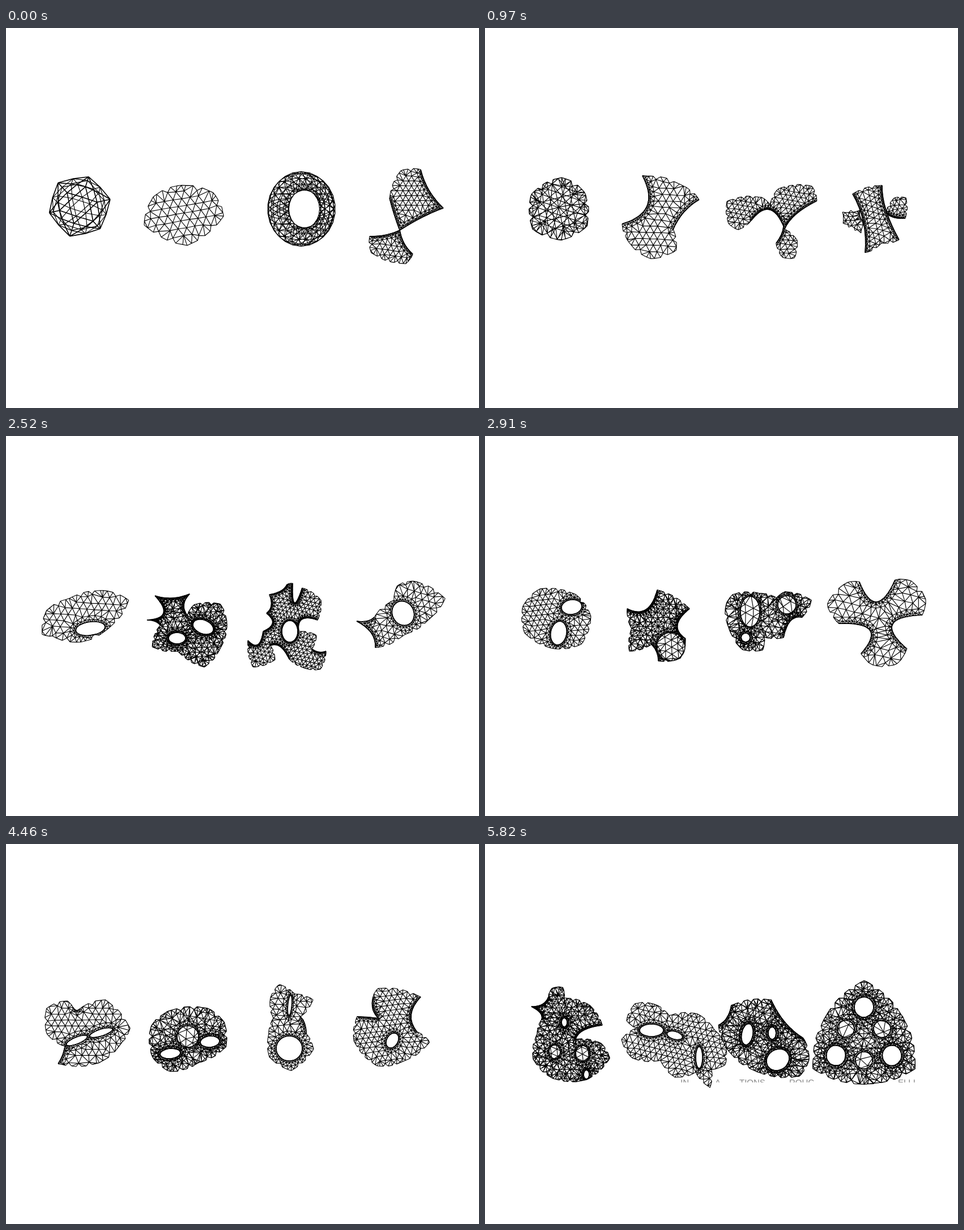
Write an HTML page with a canvas that moves like this. It is 835 px wide and 671 px high and loops after 6.79 s.

```html
<!DOCTYPE html>
<html lang="en">
<head>
<meta charset="utf-8">
<title>Wireframe surfaces</title>
<style>
html, body { margin: 0; width: 100%; height: 100%; overflow: hidden; background: #fff; }
canvas { display: block; }
</style>
</head>
<body>
<canvas id="stage" width="835" height="671"></canvas>
<script>
const HOLD = 970, RAD = Math.PI / 180;
const ctx = document.getElementById('stage').getContext('2d');
let fine, bold, seed = 7;

const random = () => (seed = seed * 16807 % 2147483647) / 2147483647;
const dist = (a, b) => Math.hypot(a[0] - b[0], a[1] - b[1]);
const polar = (cx, cy, r, deg) => [cx + r * Math.cos(deg * RAD), cy + r * Math.sin(deg * RAD)];
const line = (a, b, path = fine) => { path.moveTo(a[0], a[1]); path.lineTo(b[0], b[1]); };

// A hole is empty; a ring lets the layer behind it show through.
const hole = (x, y, rx, ry = rx, turn = 0) => ({ x, y, rx, ry, turn });
const ring = (x, y, rx, ry = rx) => ({ ...hole(x, y, rx, ry), backed: true });

// Clockwise outline: plain runs bow out and are scalloped, Q runs are smooth necks.
function trace(d, cell) {
  const tokens = d.match(/Q|[\d.]+/g), outline = [], rows = [];
  let i = 0;
  const next = () => [+tokens[i++], +tokens[i++]];
  const start = next();
  let pen = start;
  outline.push(start);

  function scallop(end) {
    const len = dist(pen, end);
    if (len < 1) return;
    const bumps = Math.max(1, Math.round(len / cell / 1.7));
    const dx = (end[0] - pen[0]) / len, dy = (end[1] - pen[1]) / len;
    const put = (t, dip) => {
      const out = len * .08 * Math.sin(Math.PI * t) - dip;
      outline.push([pen[0] + dx * len * t + dy * out, pen[1] + dy * len * t - dx * out]);
    };
    for (let k = 0; k < bumps; k++) {
      put((k + .28) / bumps, 0);
      put((k + .72) / bumps, 0);
      if (k < bumps - 1) put((k + 1) / bumps, cell * .45);
    }
    outline.push(end);
    pen = end;
  }

  function neck(c, end) {
    const n = Math.ceil((dist(pen, c) + dist(c, end)) / cell / .4);
    bold.addPath(new Path2D(`M${pen} Q${c} ${end}`));
    for (let k = 1; k <= n; k++) {
      const t = k / n, u = 1 - t;
      const p = [0, 1].map(a => u * u * pen[a] + 2 * u * t * c[a] + t * t * end[a]);
      const v = [0, 1].map(a => u * (c[a] - pen[a]) + t * (end[a] - c[a]));
      const len = Math.hypot(...v) || 1;
      const inset = r => rows.push([p[0] - v[1] / len * r, p[1] + v[0] / len * r]);
      outline.push(p);
      inset(cell * .28);
      if (k % 2) inset(cell * .75);
    }
    pen = end;
  }

  while (i < tokens.length) {
    if (tokens[i] === 'Q') { i++; neck(next(), next()); }
    else scallop(next());
  }
  scallop(start);
  return { outline, rows };
}

function inPolygon(poly, x, y) {
  let hit = false;
  poly.forEach((a, i) => {
    const b = poly[(i + 1) % poly.length];
    if (a[1] > y !== b[1] > y && x < a[0] + (y - a[1]) / (b[1] - a[1]) * (b[0] - a[0])) hit = !hit;
  });
  return hit;
}

function inHole(h, x, y) {
  const c = Math.cos(h.turn * RAD), s = Math.sin(h.turn * RAD), dx = x - h.x, dy = y - h.y;
  return Math.hypot((dx * c + dy * s) / h.rx, (dy * c - dx * s) / h.ry) < 1;
}

function rim(h, grow, step) {
  const n = Math.max(8, Math.round(Math.PI * (h.rx + h.ry + 2 * grow) / step));
  const c = Math.cos(h.turn * RAD), s = Math.sin(h.turn * RAD);
  return Array.from({ length: n }, (_, k) => {
    const [u, v] = polar(0, 0, 1, 360 * k / n), a = u * (h.rx + grow), b = v * (h.ry + grow);
    return [h.x + a * c - b * s, h.y + a * s + b * c];
  });
}

// Delaunay triangulation by incremental insertion.
const edgeKey = (a, b) => Math.min(a, b) * 1e4 + Math.max(a, b);

function triangulate(pts) {
  const n = pts.length, all = [...pts, [-9000, -9000], [9900, -9000], [400, 9900]];
  function circle(a, b, c) {
    const [ax, ay] = all[a], bx = all[b][0] - ax, by = all[b][1] - ay;
    const cx = all[c][0] - ax, cy = all[c][1] - ay, d = 2 * (bx * cy - by * cx) || 1e-9;
    const b2 = bx * bx + by * by, c2 = cx * cx + cy * cy;
    const x = (cy * b2 - by * c2) / d, y = (bx * c2 - cx * b2) / d;
    return { v: [a, b, c], x: x + ax, y: y + ay, r: x * x + y * y };
  }
  let tris = [circle(n, n + 1, n + 2)];
  pts.forEach(([x, y], i) => {
    const open = new Map();
    tris = tris.filter(t => {
      if ((t.x - x) ** 2 + (t.y - y) ** 2 >= t.r) return true;
      t.v.forEach((a, k) => {
        const b = t.v[(k + 1) % 3], key = edgeKey(a, b);
        open.has(key) ? open.delete(key) : open.set(key, [a, b]);
      });
      return false;
    });
    for (const [a, b] of open.values()) tris.push(circle(a, b, i));
  });
  return tris.map(t => t.v).filter(v => v.every(k => k < n));
}

// Triangular lattice, tightened along necks and holes.
function weave(cell, angle, { outline, rows }, holes) {
  const pts = [], seen = new Set();
  const inside = (x, y) => inPolygon(outline, x, y) && !holes.some(h => inHole(h, x, y));
  const jitter = () => (random() - .5) * cell * .07;
  const add = (p, gap) => {
    if (pts.every(q => dist(p, q) >= gap)) pts.push([p[0] + jitter(), p[1] + jitter()]);
  };
  const fill = (p, gap) => inside(...p) && add(p, gap);

  outline.forEach(p => add(p, 1));
  for (const h of holes) {
    rim(h, .1, cell * .42).forEach(p => inPolygon(outline, ...p) && add(p, 1.5));
    rim(h, cell * .28, cell * .45).forEach(p => fill(p, cell * .2));
    rim(h, cell * .8, cell * .7).forEach(p => fill(p, cell * .35));
  }
  rows.forEach(p => fill(p, cell * .22));

  const mid = [0, 1].map(a => outline.reduce((s, p) => s + p[a], 0) / outline.length);
  const n = Math.ceil(140 / cell), c = Math.cos(angle * RAD), s = Math.sin(angle * RAD);
  for (let j = -n; j <= n; j++) for (let i = -n; i <= n; i++) {
    const u = (i + (j & 1) / 2) * cell, v = j * cell * .866;
    fill([mid[0] + u * c - v * s, mid[1] + u * s + v * c], cell * .56);
  }

  for (const v of triangulate(pts)) {
    const center = [0, 1].map(a => v.reduce((sum, k) => sum + pts[k][a], 0) / 3);
    if (!inside(...center)) continue;
    v.forEach((a, k) => {
      const b = v[(k + 1) % 3], key = edgeKey(a, b);
      if (!seen.has(key)) { seen.add(key); line(pts[a], pts[b]); }
    });
  }
}

function mesh(cell, d, holes = [], layers = 1) {
  const edge = trace(d, cell), angle = random() * 30 - 10;
  for (const h of holes) {
    bold.moveTo(...rim(h, 0, 9)[0]);
    bold.ellipse(h.x, h.y, h.rx, h.ry, h.turn * RAD, 0, 2 * Math.PI);
  }
  for (let k = 0; k < layers; k++)
    weave(cell * (1 + k * .4), angle + k * 27, edge, holes.filter(h => !k || !h.backed));
}

function icosphere(cx, cy, r, turn) {
  const far = (a, b) => Math.hypot(a[0] - b[0], a[1] - b[1], a[2] - b[2]);
  const flat = ([x, y, z]) => [cx + x * r * (1 + z * .07), cy + y * r * (1 + z * .07)];
  const verts = [.795, .188, -.188, -.795].flatMap((z, i) => [0, 120, 240].map(k =>
    [...polar(0, 0, Math.sqrt(1 - z * z), turn + k + (i % 2 ? 0 : 60)), z]));
  const mids = [];
  verts.forEach((a, i) => verts.slice(i + 1).forEach(b => {
    if (far(a, b) > 1.1) return;
    const m = a.map((q, k) => (q + b[k]) / 2 * 1.04);
    mids.push(m);
    [a, b].forEach(e => line(flat(e), flat(m), bold));
  }));
  mids.forEach((a, i) => mids.slice(i + 1).forEach(b => far(a, b) < .6 && line(flat(a), flat(b))));
}

function torus(cx, cy, R, r, tilt) {
  const nu = 24, nv = 10;
  const at = (i, j) => {
    const u = 2 * Math.PI * (i + j / 2) / nu, v = 2 * Math.PI * j / nv, w = R + r * Math.cos(v);
    return [cx + w * Math.cos(u) * Math.cos(tilt) + r * Math.sin(v) * Math.sin(tilt) - 3 * Math.cos(v),
      cy + w * Math.sin(u)];
  };
  for (let j = 0; j < nv; j++) for (let i = 0; i < nu; i++) {
    line(at(i, j), at(i + 1, j));
    line(at(i, j), at(i, j + 1));
    line(at(i + 1, j), at(i, j + 1));
  }
}

// Six-pointed star with a hole in every long arm and a ring in every short one.
function star(cell, cx, cy) {
  const tips = [], holes = [];
  for (let k = 0; k < 6; k++) {
    const deg = k * 60 - 90, long = k % 2 === 0;
    tips.push(polar(cx, cy, long ? 104 : 79, deg).join(' '));
    holes.push(long ? hole(...polar(cx, cy, 57, deg), 17, 18) : ring(...polar(cx, cy, 37, deg), 15));
  }
  mesh(cell, tips.join(' '), holes, 2);
}

const scenes = [
  () => {
    icosphere(129.5, 314.5, 56, -12.4);
    mesh(15, '309 278 366 291 384 332 320 384 244 348 260 298');
    torus(524, 319.5, 49.5, 16.5, .5);
    mesh(10, '697 252 732 250 Q742 290 772 318 Q738 330 695 357 Q684 328 677 300');
    mesh(10, '695 357 Q700 384 718 399 706 416 645 397 642 368 Q674 368 695 357');
  },
  () => {
    mesh(14, '135 264 176 290 180 350 135 374 84 355 82 293', [], 2);
    mesh(13, '278 261 350 279 378 303 Q346 322 332 356 338 392 292 407 254 378 242 346 Q312 325 278 261');
    mesh(9, '427 306 488 299 503 312 518 284 577 279 586 305 Q540 328 529 355 551 375 546 406 525 405 514 380 Q526 364 527 350 Q504 296 470 340 447 356 430 345');
    mesh(10, '649 293 701 278 Q700 318 731 374 700 380 671 397 Q676 340 649 293');
    mesh(8, '708 327 722 300 743 300 742 336 Q720 338 708 327');
    mesh(8, '670 343 Q660 338 661 322 631 325 632 345 664 362');
  },
  () => {
    mesh(13, '64 350 72 308 112 287 172 273 217 290 180 340 132 364 82 353', [hole(149, 340, 26, 12, -8)]);
    mesh(9, '263 282 Q293 292 324 279 Q306 298 320 317 332 298 378 297 390 330 378 375 350 408 303 380 258 372 272 334 Q266 325 249 325 Q300 322 263 282',
      [hole(302, 357, 15, 10), hole(348, 337, 19, 12, 22)], 2);
    mesh(7.5, '465 280 Q490 276 496 262 506 260 Q504 325 523 268 556 290 550 325 Q512 312 517 345 548 352 540 376 Q552 385 565 380 555 412 528 410 500 394 Q485 362 467 370 475 395 436 408 427 361 Q448 384 454 345 Q484 332 460 313 Q474 302 465 280',
      [hole(501, 345, 14, 19)]);
    mesh(12, '619 327 Q640 330 650 320 685 290 690 265 720 256 775 287 748 322 705 350 652 374 Q654 345 619 327', [hole(701, 313, 19, 22, -25)]);
  },
  () => {
    mesh(10, '97 270 160 280 187 318 170 368 120 375 70 348 67 300', [hole(153, 302, 18, 13, -8), hole(130, 348, 14, 21, 10)]);
    mesh(9, '251 305 Q290 325 304 272 361 305 Q322 336 354 358 345 392 306 397 Q306 380 294 368 255 380 259 340', [ring(328, 372, 25)], 2);
    mesh(11, '425 300 437 280 485 278 515 286 530 275 576 290 560 320 Q535 315 527 356 493 355 490 378 455 377 430 338',
      [ring(468, 310, 17, 27), hole(460, 356, 8), ring(533, 298, 16)], 2);
    mesh(15, '604 297 640 258 661 258 Q690 330 724 254 752 256 778 288 772 316 Q680 320 745 376 728 402 685 405 664 384 Q714 328 625 331');
  },
  () => {
    mesh(12, '72 290 108 277 118 288 Q124 298 130 291 175 275 219 325 203 352 165 386 92 388 Q102 372 104 357 72 335',
      [hole(125, 347, 20, 6, -22), hole(168, 333, 21, 6, -18)]);
    mesh(12, '256 322 285 296 355 290 385 315 388 358 340 386 290 402 258 375',
      [hole(290, 370, 18, 9, -5), hole(360, 349, 17, 10, -5), ring(321, 340, 19)], 2);
    mesh(11, '482 248 510 265 542 275 520 305 Q530 315 530 335 543 362 503 400 465 376 464 335 472 308 466 275',
      [hole(500, 361, 23, 22), hole(501, 285, 3.5, 18, 5)]);
    mesh(10, '657 255 732 270 Q702 302 725 331 748 350 700 384 655 392 614 348 620 305 Q640 305 658 308 Q642 294 648 270', [hole(682, 347, 10, 14, 30)]);
  },
  () => {
    mesh(9, '66 305 140 287 180 275 215 308 208 345 150 378 108 408 90 355',
      [hole(107, 317, 13, 12), hole(140, 334, 15, 14), hole(126, 370, 13, 14), hole(157, 301, 10, 5, 35), hole(175, 350, 8, 10)], 2);
    mesh(8.5, '238 322 265 305 260 282 293 277 Q306 330 315 280 350 277 393 305 398 348 342 378 Q330 355 315 384 300 388 275 372 Q285 350 242 348',
      [ring(308, 341, 14, 12), ring(283, 320, 14, 11), ring(342, 302, 14, 12), ring(355, 340, 15, 13)], 2);
    mesh(11, '427 308 Q440 316 447 300 476 277 513 285 520 270 567 303 552 345 500 358 480 382 Q480 352 444 353 Q450 325 427 308',
      [hole(529, 316, 13, 16), hole(493, 323, 15, 3, 5)]);
    mesh(10, '587 305 618 280 655 262 Q664 314 690 255 745 268 772 305 745 358 688 362 680 388 620 375 600 357 Q618 345 590 325',
      [hole(683, 322, 17), hole(716, 305, 18, 16), ring(643, 335, 14)], 2);
  },
  () => {
    mesh(9, '82 287 Q105 288 112 270 118 255 137 253 140 272 185 285 207 320 Q165 325 160 345 205 352 220 378 180 416 120 414 85 380 92 335 100 310 Q104 298 82 287',
      [hole(140, 315, 5, 8), ring(123, 367, 10, 12), ring(172, 370, 12, 14), hole(179, 407, 5, 8)], 2);
    mesh(10, '265 282 300 283 325 303 375 300 405 328 425 360 424 390 400 398 397 430 372 403 335 412 310 382 260 378 241 345 268 325 250 312',
      [hole(294, 329, 21, 11), hole(335, 338, 14, 7, 15), hole(378, 377, 6, 19)]);
    mesh(11, '412 320 Q430 312 435 285 505 275 Q525 320 562 343 572 380 555 410 480 402 430 365',
      [hole(463, 336, 10, 19, 10), hole(507, 334, 7, 11), hole(517, 381, 21, 18, -35)], 2);
    star(13, 669, 345);
  }
].map(build => {
  fine = new Path2D();
  bold = new Path2D();
  build();
  return { fine, bold };
});

// Tops of a cropped caption along the lower edge of the last picture.
function caption() {
  ctx.save();
  ctx.beginPath();
  ctx.rect(340, 414, 432, 7);
  ctx.clip();
  ctx.font = '15px "Liberation Sans", sans-serif';
  ctx.fillStyle = '#888';
  [['IN', 345], ['A', 406], ['TIONS', 449], ['ROUC', 537], ['ELLI', 729]]
    .forEach(([text, x]) => ctx.fillText(text, x, 426));
  ctx.restore();
}

let shown = -1;
function draw(now) {
  const i = Math.floor(now / HOLD) % scenes.length;
  if (i !== shown) {
    shown = i;
    ctx.fillStyle = '#fff';
    ctx.fillRect(0, 0, 835, 671);
    if (i === scenes.length - 1) caption();
    ctx.strokeStyle = '#000';
    ctx.lineJoin = 'round';
    ctx.lineWidth = 1.15;
    ctx.stroke(scenes[i].fine);
    ctx.lineWidth = 1.6;
    ctx.stroke(scenes[i].bold);
  }
  requestAnimationFrame(draw);
}
draw(0);
</script>
</body>
</html>
```
